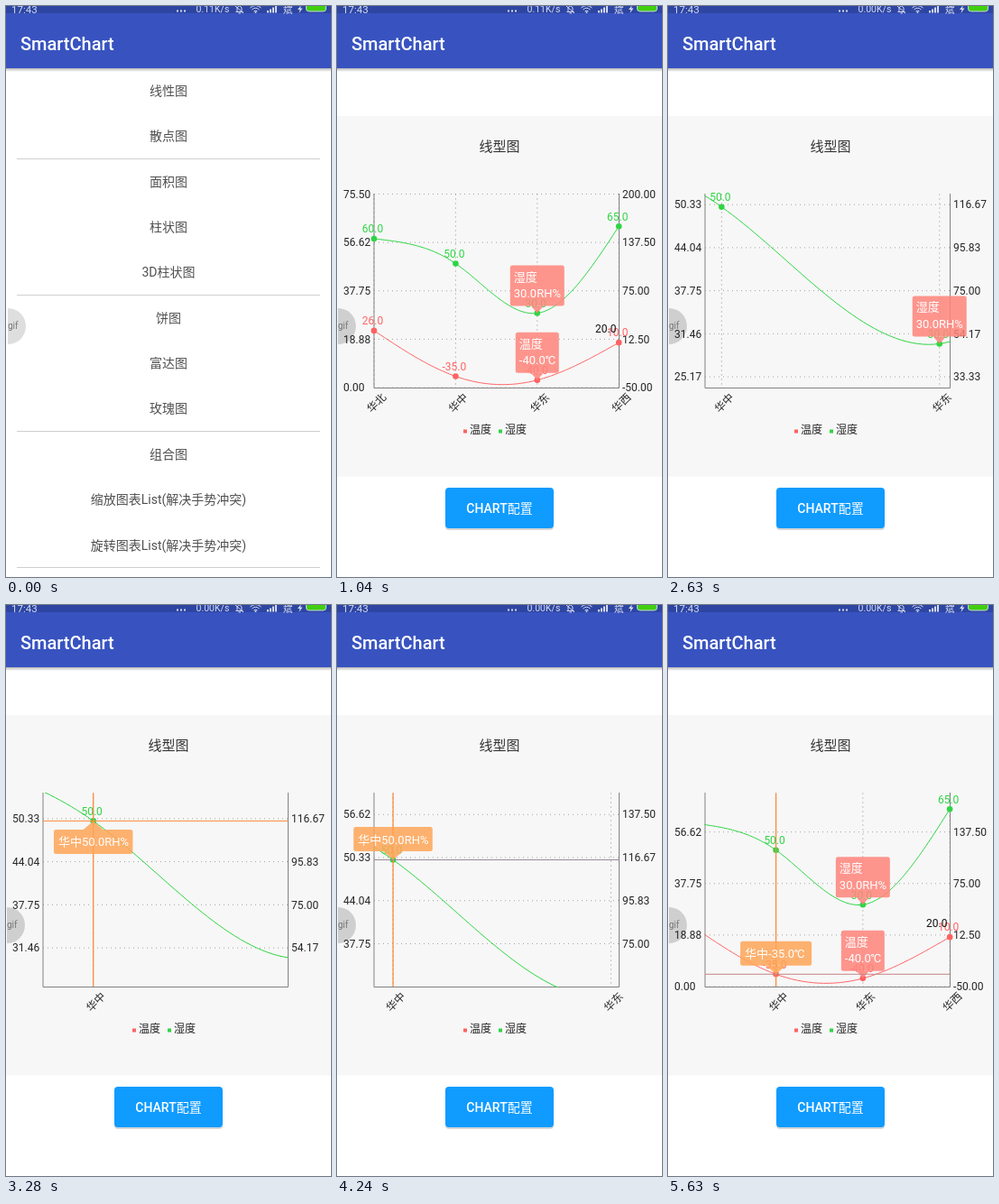
Write an HTML page that moves like this. It is 360 px wide and 633 px high and loops after 6.63 s.

```html
<!DOCTYPE html>
<html lang="zh-CN">
<head>
<meta charset="utf-8">
<title>SmartChart</title>
<style>
html, body { margin: 0; width: 100%; height: 100%; overflow: hidden; background: #fff; }
svg { display: block; width: 100vw; height: 100vh; }
text { font-family: Roboto, "Noto Sans CJK SC", "Noto Sans CJK", sans-serif; white-space: pre; }
</style>
</head>
<body>
<svg id="stage" viewBox="0 0 360 633">
  <defs>
    <clipPath id="plot"><rect x="40.5" y="208" width="272.5" height="216"/></clipPath>
    <linearGradient id="shade" x2="0" y2="1">
      <stop offset="0" stop-color="#000" stop-opacity=".28"/>
      <stop offset="1" stop-color="#000" stop-opacity="0"/>
    </linearGradient>
    <g id="bar">
      <rect width="360" height="69" fill="#3853c0"/>
      <rect width="360" height="8" fill="#2e46a2"/>
      <rect y="69" width="360" height="4" fill="url(#shade)"/>
      <text x="16" y="49" font-size="20" font-weight="500" fill="#fff">SmartChart</text>
    </g>
  </defs>
  <g id="list"></g>
  <g id="page">
    <rect width="360" height="633" fill="#fff"/>
    <use href="#bar"/>
    <rect y="122" width="360" height="399.5" fill="#f7f7f7"/>
    <g id="chart"></g>
    <rect x="120" y="536" width="120" height="45" rx="4" fill="#000" opacity=".16"/>
    <rect x="120" y="534" width="120" height="45" rx="4" fill="#109bff"/>
    <text x="180" y="562.300" font-size="14" font-weight="500" fill="#fff" text-anchor="middle">CHART配置</text>
  </g>
  <g id="status" fill="#d4daf0">
    <text x="6" y="7.500" font-size="11.5">17:43</text>
    <path d="M189 4.5h2v2h-2zM193 4.5h2v2h-2zM197 4.5h2v2h-2z"/>
    <text id="speed" x="210.500" y="7" font-size="10.5"></text>
    <g fill="none" stroke="#d4daf0">
      <path d="M254.500 6.500h8M256 6V2q2.500-4 5 0v4M257.500 8h2.500M254 0l9 8"/>
      <path d="M270.500 2q6-5 12 0M272.500 4q4-3.500 8 0M274.500 6q2-2 4 0"/>
    </g>
    <circle cx="276.500" cy="7" r="1"/>
    <path d="M289 5h2v2.500h-2zM292 3.500h2v4h-2zM295 1.500h2v6h-2zM298 0h2v7.500h-2z"/>
    <text x="307" y="7.500" font-size="10.500">斌</text>
    <path d="M327-1l-4 5h2.500l-1 4 4-5.500h-2.500z"/>
    <rect x="332.500" y="-3" width="22" height="9" rx="3" fill="#41cf10" stroke="#c7d2ea"/>
  </g>
  <g id="bubble">
    <path d="M2 335a20 20 0 0 1 0 40z" fill="#000"/>
    <text x="2" y="358" font-size="10" fill="#777">gif</text>
  </g>
</svg>
<script>
const LOOP = 6630;
const L = 41, R = 312.5, T = 208.5, B = 423;
const RED = '#ff6262', GREEN = '#2fd545', INK = '#262626', ORANGE = '#ff8a3c';
const cities = ['华北', '华中', '华东', '华西'];
const $ = id => document.getElementById(id);

const steps = [0, 110, 380, 480, 570, 660, 760, 850, 950, 1040, 1140, 1250, 1410,
  2130, 2170, 2260, 2350, 2440, 2630, 2860, 3080, 3180, 3280, 3380, 3480, 3570, 3660,
  3750, 3850, 3950, 4240, 4340, 4430, 4520, 4600, 4690, 4780, 4990, 5160, 5180];

// time, zoom, x of the first category, y of the zero line
const views = [
  [0, 1, 41, 423], [1410, 1, 41, 423], [2130, 1.177, 20.3, 441.9],
  [2170, 1.3, 3.4, 455], [2630, 2.67, -182, 602], [2860, 2.67, -182, 610],
  [3280, 2.67, -144.7, 618.7], [3660, 2.67, -165, 640], [3950, 2.67, -177, 656],
  [4240, 2.67, -179.3, 661.8], [4780, 1.065, 24.3, 436.9], [4990, 1.065, 23.8, 432],
  [5160, 1.065, 23.4, 426], [5180, 1.065, 23.3, 423]
];

// Each series lives on its own axis
const series = [
  { name: '温度', unit: '℃', color: RED, data: [26, -35, -40, 10], min: -50, span: 250, tip: 48 },
  { name: '湿度', unit: 'RH%', color: GREEN, data: [60, 50, 30, 65], min: 0, span: 75.5, tip: 60 }
];

const clamp = v => Math.min(1, Math.max(0, v));
const n = v => v.toFixed(2);

function viewAt(t) {
  const i = views.findIndex(v => v[0] > t);
  if (i < 0) return views[views.length - 1].slice(1);
  const a = views[i - 1], b = views[i], k = (t - a[0]) / (b[0] - a[0]);
  return a.slice(1).map((v, j) => v + (b[j + 1] - v) * k);
}

function text(s, x, y, size, fill, more = '') {
  return `<text x="${n(x)}" y="${n(y)}" font-size="${size}" fill="${fill}" ${more}>${s}</text>`;
}
const mid = (s, x, y, size, fill, more = '') =>
  text(s, x, y + size * .36, size, fill, 'text-anchor="middle" ' + more);
const line = (x1, y1, x2, y2, color, more = '') =>
  `<path d="M${n(x1)} ${n(y1)}L${n(x2)} ${n(y2)}" stroke="${color}" fill="none" ${more}/>`;

// Two decimals, ties to even
function money(v) {
  const k = v * 100, f = Math.floor(k);
  const tie = Math.abs(k - f - .5) < 1e-6;
  return ((tie ? f + (f & 1) : Math.round(k)) / 100).toFixed(2);
}

// Natural cubic spline through four evenly spaced values
function spline(d) {
  const a = 6 * (d[0] - 2 * d[1] + d[2]), b = 6 * (d[1] - 2 * d[2] + d[3]);
  const m = [0, (4 * a - b) / 15, (4 * b - a) / 15, 0];
  return x => {
    const i = Math.min(2, Math.floor(x)), u = x - i, w = 1 - u;
    return d[i] * w + d[i + 1] * u + (m[i] * (w ** 3 - w) + m[i + 1] * (u ** 3 - u)) / 6;
  };
}
series.forEach(s => s.curve = spline(s.data));

// Speech box with its arrow on the point
function tip(x, y, w, h, rows, fill, below, half) {
  const multi = rows.length > 1, gap = multi ? 8 : 9.5;
  const top = below ? y + gap : y - gap - h, left = x - w / 2;
  const edge = below ? top : top + h;
  return `<g fill="${fill}" opacity=".85"><rect x="${n(left)}" y="${n(top)}" width="${w}" height="${h}" rx="2.5"/>` +
    `<path d="M${n(x - half)} ${n(edge)}L${n(x)} ${n(y)}L${n(x + half)} ${n(edge)}z"/></g>` +
    rows.map((r, i) => text(r, left + (multi ? 4 : 5), top + (multi ? 17 : 18.5) + i * 18.5, 13, '#fff')).join('');
}

function chart(t) {
  const [z, x0, y0] = viewAt(t);
  const grow = 1 - (1 - clamp((t - 589) / 661)) ** 3;
  const sx = 90.4 * z, sy = 214.5 * z;
  const px = i => x0 + i * sx;
  const py = (s, v) => y0 - (v - s.min) / s.span * sy * grow;
  const inX = x => x > L - 1 && x < R + 1;
  const inY = (y, slack = 1.5) => y > T - slack && y < B + slack;
  let out = mid('线型图', 180, 156, 15, '#333');

  const count = 4 * Math.round(z);
  for (let i = 0; i <= count; i++) {
    const y = y0 - sy * i / count;
    if (!inY(y, .1)) continue;
    out += line(L, y, R, y, '#a2a2a2', 'stroke-dasharray="1 4"');
    out += text(money(75.5 * i / count), 7, y + 4.2, 12, INK);
    out += text(money(250 * i / count - 50), 316, y + 4.2, 12, INK);
  }
  cities.forEach((c, i) => {
    const x = px(i);
    if (!inX(x)) return;
    out += line(x, T, x, B, '#8c8c8c', 'stroke-dasharray="1 4"');
    out += mid(c, x + 2.8, 440, 12, INK, `transform="rotate(-45 ${n(x + 2.8)} 440)"`);
  });
  out += `<path d="M41 208V423.500H312.500V208" fill="none" stroke="#828282"/>`;

  let tips = '';
  for (const s of series) {
    let d = '';
    for (let i = 0; i <= 120; i++) d += (i ? 'L' : 'M') + n(px(i / 40)) + ' ' + n(py(s, s.curve(i / 40)));
    out += `<path d="${d}" fill="none" stroke="${s.color}" clip-path="url(#plot)"/>`;
    s.data.forEach((v, i) => {
      const x = px(i), y = py(s, v);
      if (!inX(x) || !inY(y)) return;
      const label = v.toFixed(1);
      out += `<circle cx="${n(x)}" cy="${n(y)}" r="3.3" fill="${s.color}"/>`;
      out += mid(label, x - 1.5, y - 11, 12, s.color);
      if (i === 2) tips = tip(x, y, s.tip, 45, [s.name, label + s.unit], '#ff857b', false, 7) + tips;
    });
  }
  const level = y0 - .28 * sy * grow;
  if (inY(level)) out += text('20.0', 309.5, level - 2.5, 12, '#111', 'text-anchor="end"');
  out += tips;

  // Cross on the touched point
  if (t >= 3080) {
    const s = series[t < 4780 ? 1 : 0], x = px(1), y = py(s, s.data[1]);
    if (inX(x) && inY(y)) {
      out += line(x, T, x, B, ORANGE, 'stroke-width="1.3"');
      out += line(L, y, R, y, t < 3660 ? ORANGE : s.color === RED ? '#c78484' : '#988a98');
      out += tip(x, y, s.color === RED ? 79 : 87.5, 27,
        [cities[1] + s.data[1].toFixed(1) + s.unit], '#ffa557', y - 36 < T, 11);
    }
  }

  out += `<path d="M140 469.500h4v4h-4z" fill="${RED}"/><path d="M179 469.500h4v4h-4z" fill="${GREEN}"/>`;
  return out + text('温度', 147, 473.5, 12, INK) + text('湿度', 186, 473.5, 12, INK);
}

const items = ['线性图', '散点图', '面积图', '柱状图', '3D柱状图', '饼图', '富达图', '玫瑰图',
  '组合图', '缩放图表List(解决手势冲突)', '旋转图表List(解决手势冲突)'];
$('list').innerHTML = '<rect width="360" height="633" fill="#fff"/><use href="#bar"/>' +
  items.map((s, i) => mid(s, 180, 94 + i * 50.35, 14, '#505050')).join('') +
  [0, 1, 2, 3].map(i => line(12, 169.5 + i * 151, 348, 169.5 + i * 151, '#cfcfcf')).join('');

let shown = -1;
function draw(now) {
  const time = now % LOOP;
  const t = steps.filter(s => s <= time).pop();
  if (t === shown) return;
  shown = t;
  const slide = 360 * (1 - clamp((t - 380) / 320)) ** 3;
  $('page').setAttribute('transform', `translate(${n(slide)} 0)`);
  $('page').style.display = t > 380 ? '' : 'none';
  $('chart').innerHTML = t > 380 ? chart(t) : '';
  $('speed').textContent = t < 2350 ? '0.11K/s' : '0.00K/s';
  $('bubble').firstElementChild.setAttribute('opacity', t < 110 ? .13 : .16);
  $('bubble').setAttribute('transform', `translate(${t < 110 ? 0 : -1} 0)`);
}

const start = performance.now();
function tick() {
  draw(performance.now() - start);
  requestAnimationFrame(tick);
}
tick();
</script>
</body>
</html>
```
